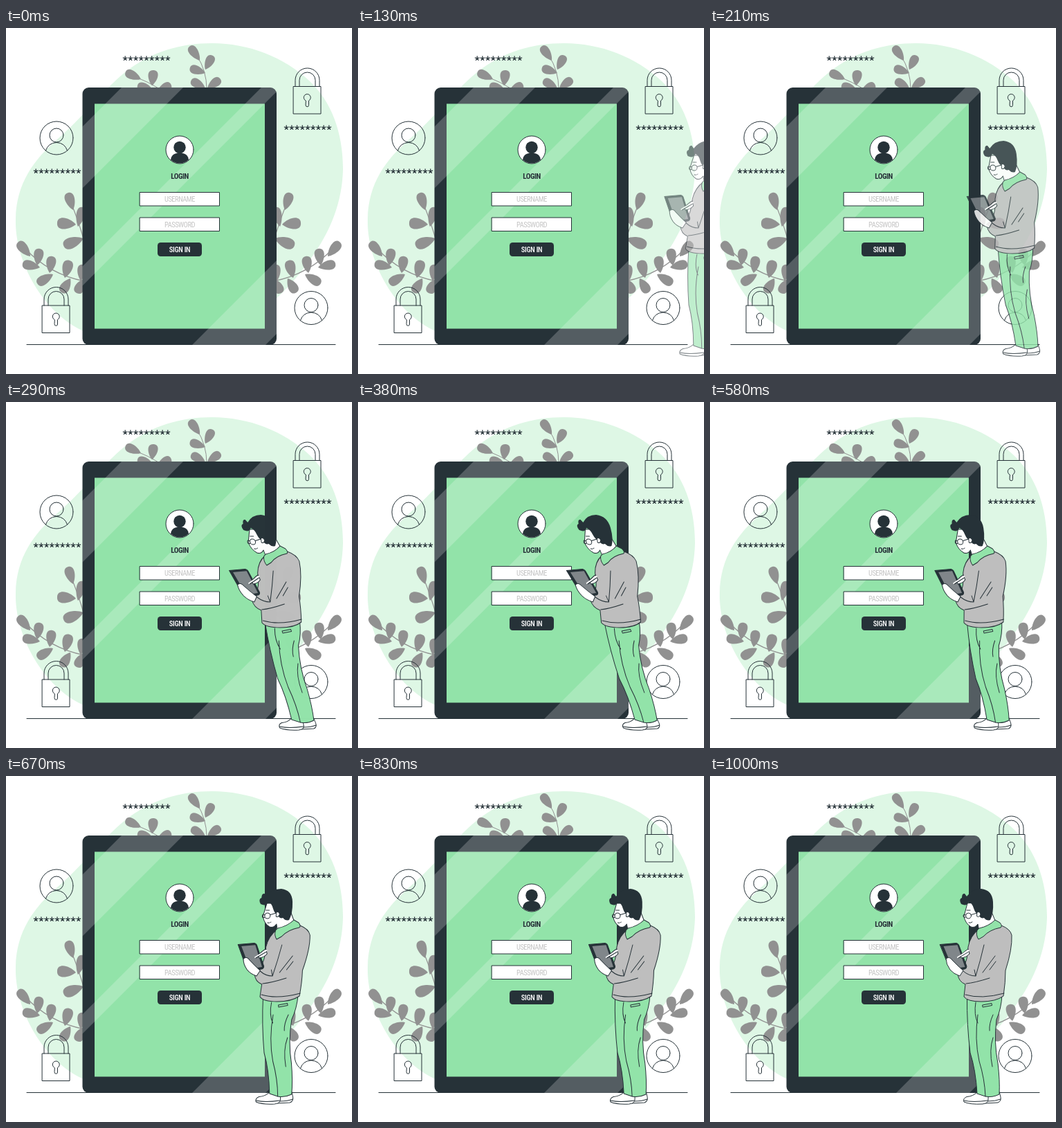
Recreate the animation shown at these times as an HTML page with a canvas. Size 500x500 px, loop 1.04 s.

```html
<!DOCTYPE html>
<html lang="en">
<head>
<meta charset="utf-8">
<title>Sign in</title>
<style>
html, body { margin: 0; width: 100%; height: 100%; overflow: hidden; background: #fff; }
canvas { position: absolute; left: 0; top: 0; width: 500px; height: 500px; }
</style>
</head>
<body>
<canvas id="scene"></canvas>
<canvas id="figure"></canvas>
<script>
const DARK = '#263238', GREEN = '#92e3a9', PALE = '#def7e5', LEAF = '#919191', WOOL = '#bebebe';
const dpr = window.devicePixelRatio || 1;

function setup(id) {
  const c = document.getElementById(id);
  c.width = c.height = 500 * dpr;
  const g = c.getContext('2d');
  g.scale(dpr, dpr);
  g.lineCap = g.lineJoin = 'round';
  return g;
}

function shape(g, d, fill, stroke, width = 1) {
  const p = new Path2D(d);
  if (fill) { g.fillStyle = fill; g.fill(p); }
  if (stroke) { g.strokeStyle = stroke; g.lineWidth = width; g.stroke(p); }
}

function circle(g, x, y, r, fill, stroke, width = 1) {
  g.beginPath();
  g.arc(x, y, r, 0, Math.PI * 2);
  if (fill) { g.fillStyle = fill; g.fill(); }
  if (stroke) { g.strokeStyle = stroke; g.lineWidth = width; g.stroke(); }
}

function box(g, x, y, w, h, r, fill, stroke) {
  g.beginPath();
  g.roundRect(x, y, w, h, r);
  g.fillStyle = fill;
  g.fill();
  if (stroke) { g.strokeStyle = stroke; g.lineWidth = 1; g.stroke(); }
}

function label(g, text, y, weight, size, color, gap) {
  g.font = `${weight} ${size}px "Roboto Condensed", "Liberation Sans Narrow", Roboto, sans-serif`;
  g.letterSpacing = gap + 'px';
  g.textAlign = 'center';
  g.textBaseline = 'middle';
  g.fillStyle = color;
  g.fillText(text, 251, y);
}

// Leaf with a narrow base and a round tip
function leaf(g, bx, by, tx, ty, w = 12) {
  const len = Math.hypot(tx - bx, ty - by);
  g.save();
  g.translate(bx, by);
  g.rotate(Math.atan2(ty - by, tx - bx));
  g.beginPath();
  g.moveTo(0, 0);
  g.bezierCurveTo(len * .3, -w * .55, len, -w * .95, len, 0);
  g.bezierCurveTo(len, w * .75, len * .35, w * .6, 0, 0);
  g.fillStyle = LEAF;
  g.fill();
  g.restore();
}

function topPlants(g) {
  shape(g, 'M290 88Q290 62 276 40M222 88Q206 78 188 71M212 82L212 74', null, LEAF);
  leaf(g, 280, 47, 266, 26);
  leaf(g, 288, 60, 299, 40);
  leaf(g, 288, 65, 266, 57);
  leaf(g, 291, 87, 310, 74);
  leaf(g, 288, 87, 268, 75);
  leaf(g, 195, 74, 173, 63);
  leaf(g, 211, 83, 214, 61, 13);
  leaf(g, 211, 88, 190, 83);
  leaf(g, 220, 89, 239, 83);
}

function sidePlants(g) {
  shape(g, 'M113 308Q106 282 93 250M114 366Q62 356 27 318', null, LEAF, 1.2);
  leaf(g, 97, 263, 90, 238, 13);
  leaf(g, 104, 287, 111, 259);
  leaf(g, 101, 284, 74, 281, 15);
  leaf(g, 112, 304, 83, 314, 15);
  leaf(g, 35, 330, 18, 309, 13);
  leaf(g, 45, 343, 49, 319, 13);
  leaf(g, 49, 346, 24, 340, 13);
  leaf(g, 63, 354, 67, 330, 13);
  leaf(g, 68, 356, 45, 369, 13);
  leaf(g, 85, 361, 92, 336, 14);
  leaf(g, 93, 362, 80, 382, 13);
  leaf(g, 108, 365, 112, 342, 13);
  leaf(g, 112, 363, 102, 383, 13);
}

function stars(g, x, y) {
  g.strokeStyle = DARK;
  g.lineWidth = 1.3;
  g.beginPath();
  for (let i = 0; i < 9; i++) {
    const cx = x + 3.2 + i * 7.7;
    for (let k = 0; k < 5; k++) {
      const a = k * Math.PI * .4 - Math.PI / 2;
      g.moveTo(cx, y);
      g.lineTo(cx + 3 * Math.cos(a), y + 3 * Math.sin(a));
    }
  }
  g.stroke();
}

function lock(g, x, y) {
  g.save();
  g.translate(x, y);
  shape(g, 'M0 0H39.5V39.5H0Z', null, DARK);
  shape(g, 'M2.5 0V-9A17.5 17.5 0 0 1 37.5 -9V0M8.5 0V-9A11.5 11.5 0 0 1 31.5 -9V0', null, DARK);
  shape(g, 'M17.5 20.5A5 5 0 1 1 22 20.5V27A2.2 2.2 0 0 1 17.5 27Z', null, DARK);
  g.restore();
}

function person(g, x, y) {
  circle(g, x, y, 24, null, DARK);
  circle(g, x, y - 4, 10, null, DARK);
  shape(g, `M${x - 15.5} ${y + 18}Q${x - 12} ${y + 7} ${x} ${y + 6.5}Q${x + 12} ${y + 7} ${x + 15.5} ${y + 18}`, null, DARK);
}

// Diagonal sheen between the lines x + y = a and x + y = b
function sheen(g, a, b) {
  shape(g, `M${a - 80} 80H${b - 80}L${b - 470} 470H${a - 470}Z`, 'rgba(255,255,255,.21)');
}

function tablet(g) {
  box(g, 110.5, 86, 280.5, 372, 9, DARK);
  box(g, 128, 109.5, 246, 325, 0, GREEN);
  g.save();
  g.beginPath();
  g.roundRect(110.5, 86, 280.5, 372, 9);
  g.clip();
  sheen(g, 253, 342);
  sheen(g, 455, 483);
  sheen(g, 727, 833);
  g.restore();

  circle(g, 251, 176, 20, '#fff', DARK);
  circle(g, 251, 172.5, 8.7, DARK);
  shape(g, 'M238 190.5Q239 180.5 251 180.5Q263 180.5 264 190.5Q258 195.5 251 195.5Q244 195.5 238 190.5Z', DARK);
  label(g, 'LOGIN', 215, 700, 11, DARK, -.4);
  box(g, 193.5, 237.5, 115, 19.5, 0, '#fff', DARK);
  label(g, 'USERNAME', 248, 400, 10.5, '#c4c4c4', -.5);
  box(g, 193.5, 274, 115, 19.5, 0, '#fff', DARK);
  label(g, 'PASSWORD', 284.5, 400, 10.5, '#c4c4c4', -.5);
  box(g, 219, 310, 64, 20, 4.5, DARK);
  label(g, 'SIGN IN', 320.5, 500, 10.5, '#fff', -.3);
}

function drawScene(g) {
  shape(g, 'M14 275C15 225 40 190 75 160C112 128 138 92 172 64C210 34 252 22 298 22C350 22 402 42 438 76' +
    'C470 106 487 150 487 204C486 250 470 293 440 334C400 390 350 436 270 452C210 462 150 455 110 437C56 412 12 340 14 275Z', PALE);
  topPlants(g);
  sidePlants(g);
  g.save();
  g.translate(500, 0);
  g.scale(-1, 1);
  sidePlants(g);
  g.restore();
  stars(g, 169, 44);
  stars(g, 402, 144);
  stars(g, 40, 207);
  lock(g, 415.5, 84.5);
  lock(g, 52.5, 401);
  person(g, 73, 159);
  person(g, 441, 404.5);
  shape(g, 'M30 457.5H476', null, DARK);
  tablet(g);
}

function drawMan(g) {
  const ink = (d, fill) => shape(g, d, fill, DARK);
  // shoes and trousers
  ink('M396 462Q394 472 398 473L416 472Q421 470 420 464L418 456H400Z', '#fff');
  ink('M386 457Q380 463 371 463.5Q365 466 367 471Q376 475 394 474Q403 473 402 466V457Z', '#fff');
  ink('M367 469Q380 472 401 469M402 470Q412 470 420 467');
  ink('M371.5 318L422 316Q421 336 414 352Q410 385 416 415Q419 440 418 460Q408 465 398 463L386 459Q384 425 376 400Q371 360 371.5 318Z', GREEN);
  ink('M384 327Q381 345 387 357M387 345Q382 380 389 412Q397 438 398 463M409 345Q403 358 404 368M409 378Q403 396 408 420M394 331L407 328.5L407.5 331.5L394.5 334Z');
  // neck and face
  ink('M372 184Q369 195 367 203Q369 213 377 218Q383 220 387 214L389 224Q404 220 412 209L402 184Z', '#fff');
  // jumper
  ink('M388 222Q376 231 373 247Q373 266 364 281L358 286Q359 297 369 301L367 319Q372 326 392 326Q413 326 424 318Q427 298 427 281Q437 250 436 230Q434 221 421 216Q405 216 388 222Z', WOOL);
  ink('M386 223L389 220Q403 217 412 208L419 212Q423 217 420 219Q404 222 395 232L388 236Q384 230 386 223Z', GREEN);
  // device and hands
  ink('M332.5 243.5L356 241.5Q358.5 242 359.5 244L371 275Q371 278.5 368 279L352 281Q347 280 345 275Z', DARK);
  shape(g, 'M337.5 246L357.5 244.2L368.5 276L351 278.5Z', '#80868a');
  ink('M341 264Q346 260 350 266L357 273Q362 278 366 281L361 289Q352 286 347 280Q341 272 341 264Z', '#fff');
  ink('M362 260Q367 253 373 250L375 257Q371 262 364 263Z', '#fff');
  shape(g, 'M358 262L374 252', null, '#fff', 2);
  ink('M359 263L373 254.5');
  // sleeve folds
  ink('M396 244Q391 266 384 289Q374 289 366 282M370 300Q382 299 404 292M384 289L382 280M369 316Q392 323 425 314M412 260L394 284M413 268L404 280');
  // hair and glasses
  shape(g, 'M363 185Q359 178 364 176Q364 169 368 170L371 174Q379 163 392 163Q408 165 409 182Q410 198 405 208Q400 210 396 205Q390 207 388 199Q384 200 381 191Q379 184 374 182Q371 189 363 185Z', DARK);
  ink('M386 197Q390 195 391 200Q389 205 386 203Z', '#fff');
  circle(g, 373.5, 202, 4, '#fff', DARK);
  ink('M369.5 201Q366 198 366 203Q367 206 369.5 204M377.5 200.5L386 198M374 212Q377 213 379 211M371 194L376 194');
}

// Cubic Bezier easing (.36, -.01, .5, 1.38)
function ease(x) {
  const at = (a, b, s) => 3 * a * s * (1 - s) ** 2 + 3 * b * s * s * (1 - s) + s ** 3;
  let lo = 0, hi = 1;
  for (let i = 0; i < 30; i++) {
    const mid = (lo + hi) / 2;
    if (at(.36, .5, mid) < x) lo = mid; else hi = mid;
  }
  return at(-.01, 1.38, lo);
}

const LOOP = 1040, STEP = 1000 / 24, LEAD = 153, SPAN = 1110, PIVOT = 319;
const tan = deg => Math.tan(deg * Math.PI / 180);
const mix = (a, b, k) => a + (b - a) * k;

// Slide in with a lean, swing back, settle
function pose(p) {
  if (p < .6) {
    const k = ease(p / .6);
    return { shift: 250 * (1 - k), lean: mix(tan(-20), tan(10), k), alpha: Math.max(0, Math.min(1, k)) };
  }
  const lean = p < .8 ? mix(tan(10), tan(-2), ease((p - .6) / .2))
    : p < 1 ? mix(tan(-2), 0, ease((p - .8) / .2)) : 0;
  return { shift: 0, lean, alpha: 1 };
}

const scene = setup('scene'), figure = setup('figure');
drawScene(scene);

function frame() {
  const t = performance.now() % LOOP;
  const step = Math.min(24, Math.floor((t + 4) / STEP));
  const { shift, lean, alpha } = pose((step * STEP + LEAD) / SPAN);
  figure.clearRect(0, 0, 500, 500);
  figure.save();
  figure.transform(1, 0, lean, 1, shift - lean * PIVOT, 0);
  drawMan(figure);
  figure.restore();
  figure.canvas.style.opacity = alpha;
  requestAnimationFrame(frame);
}
frame();
</script>
</body>
</html>
```
